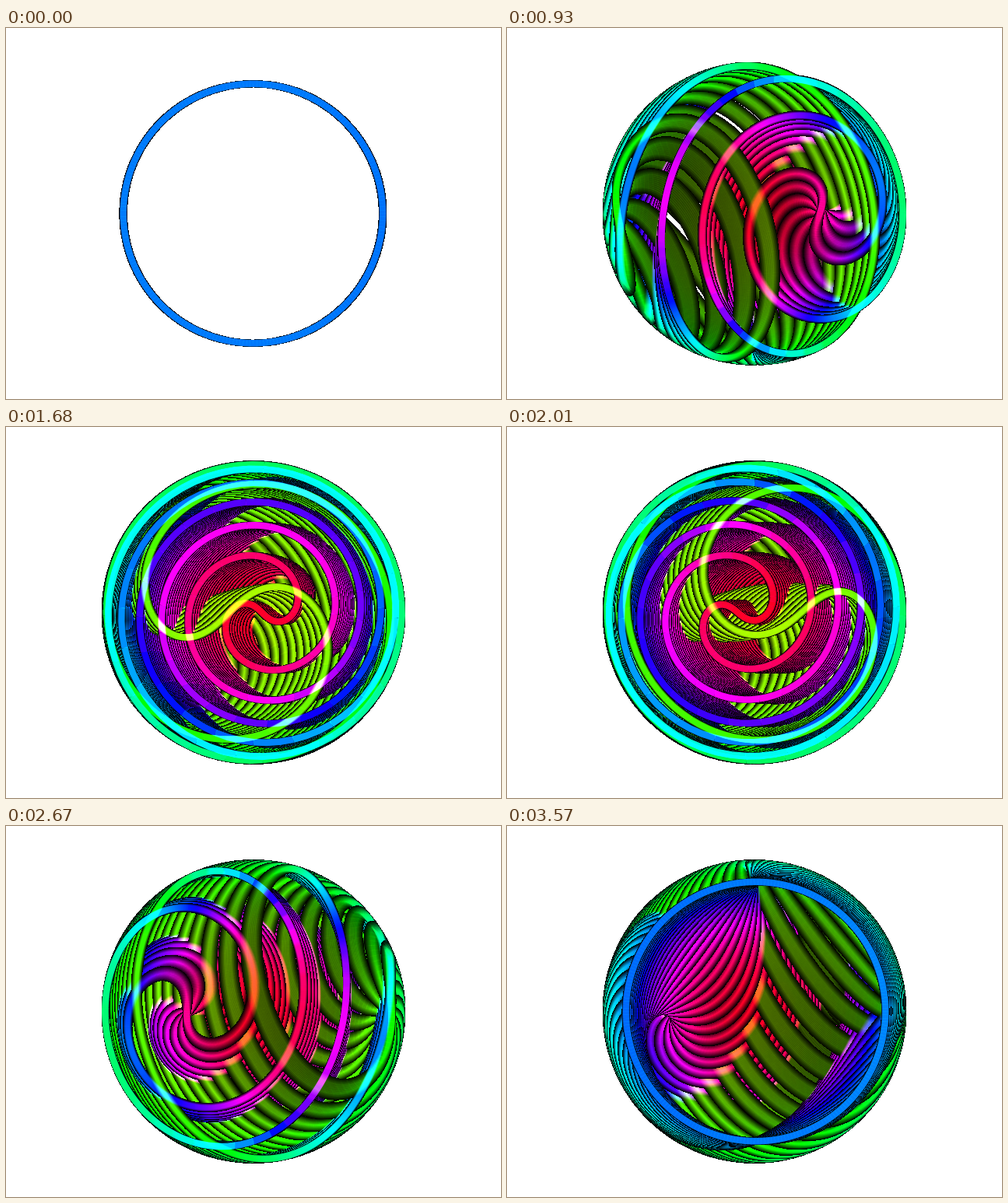
These frames come from a looping animation (636x477 px, 3600 ms). An HTML page with a canvas:

```html
<!DOCTYPE html>
<html lang="en">
<head>
<meta charset="utf-8">
<title>Twisting circle</title>
<style>
  html, body { margin: 0; width: 100%; height: 100%; overflow: hidden; background: #fff; }
  canvas { display: block; }
</style>
</head>
<body>
<canvas id="stage" width="636" height="477"></canvas>
<script>
const FRAMES = 120, FRAME_MS = 30;
const SAMPLES = 12, SHUTTER = 0.6;     // motion blur
const POINTS = 720, GROUP = 3;         // points on the curve, segments per stroke
const RADIUS = 166.7, CAMERA = 2.06;   // camera distance in sphere radii
const MAX_TWIST = 3.75 * Math.PI;      // from equator to pole
const SIZE = 400, LEFT = 118, TOP = 38;
const CX = 318 - LEFT, CY = 238.5 - TOP;

const stage = document.getElementById('stage').getContext('2d');
const layers = [];
let shown = -1;

const ease = s => s < 0.5 ? 4 * s ** 3 : 1 - 4 * (1 - s) ** 3;

// A great circle through the twist axis, twisted about it, turned half round per loop.
function curvePoint(theta, twist, turn) {
  const c = Math.cos(theta), s = Math.sin(theta);
  const side = s * Math.sin(twist * c), up = s * Math.cos(twist * c);
  const x = c * Math.sin(turn) + side * Math.cos(turn);
  const z = side * Math.sin(turn) - c * Math.cos(turn);
  const scale = RADIUS * CAMERA / (CAMERA - z);
  return { x: CX + x * scale, y: CY - up * scale, z };
}

// Blue at mid depth, through green to olive in front, through magenta to red behind.
function depthColor(z) {
  const hue = 212 - (z > 0 ? 132 * z : 140 * (1.3 * z - 0.3 * z ** 3));
  return `hsl(${hue.toFixed(1)},100%,50%)`;
}

function strokeCurve(ctx, u) {
  const twist = MAX_TWIST * ease(1 - Math.abs(2 * u - 1));
  const turn = Math.PI * (0.5 - u);
  const pts = Array.from({ length: POINTS + 1 },
    (_, i) => curvePoint(i / POINTS * 2 * Math.PI, twist, turn));
  for (let i = 0; i < POINTS; i += GROUP) {
    ctx.strokeStyle = depthColor((pts[i].z + pts[i + GROUP].z) / 2);
    ctx.beginPath();
    for (let j = i; j <= i + GROUP; j++) ctx.lineTo(pts[j].x, pts[j].y);
    ctx.stroke();
  }
}

// Light adds up on black; every pixel it touches becomes opaque.
function makeLayer(frame) {
  const canvas = document.createElement('canvas');
  canvas.width = canvas.height = SIZE;
  const ctx = canvas.getContext('2d', { willReadFrequently: true });
  ctx.globalCompositeOperation = 'lighter';
  ctx.globalAlpha = 1 / SAMPLES;
  ctx.lineWidth = 8.6;
  ctx.lineJoin = 'round';
  for (let i = 0; i < SAMPLES; i++) {
    strokeCurve(ctx, (frame + SHUTTER * i / SAMPLES) / FRAMES);
  }
  const image = ctx.getImageData(0, 0, SIZE, SIZE), d = image.data;
  for (let i = 0; i < d.length; i += 4) {
    const a = d[i + 3];
    if (!a) continue;
    for (let k = 0; k < 3; k++) d[i + k] *= a / 255;
    d[i + 3] = 255;
  }
  ctx.putImageData(image, 0, 0);
  return canvas;
}

function render(now) {
  const frame = Math.floor(now / FRAME_MS) % FRAMES;
  if (frame < shown) shown = -1;
  if (shown < 0) {
    stage.fillStyle = '#fff';
    stage.fillRect(0, 0, 636, 477);
  }
  while (shown < frame) {
    shown++;
    layers[shown] ||= makeLayer(shown);
    stage.drawImage(layers[shown], LEFT, TOP);
  }
  requestAnimationFrame(render);
}
requestAnimationFrame(render);
</script>
</body>
</html>
```
